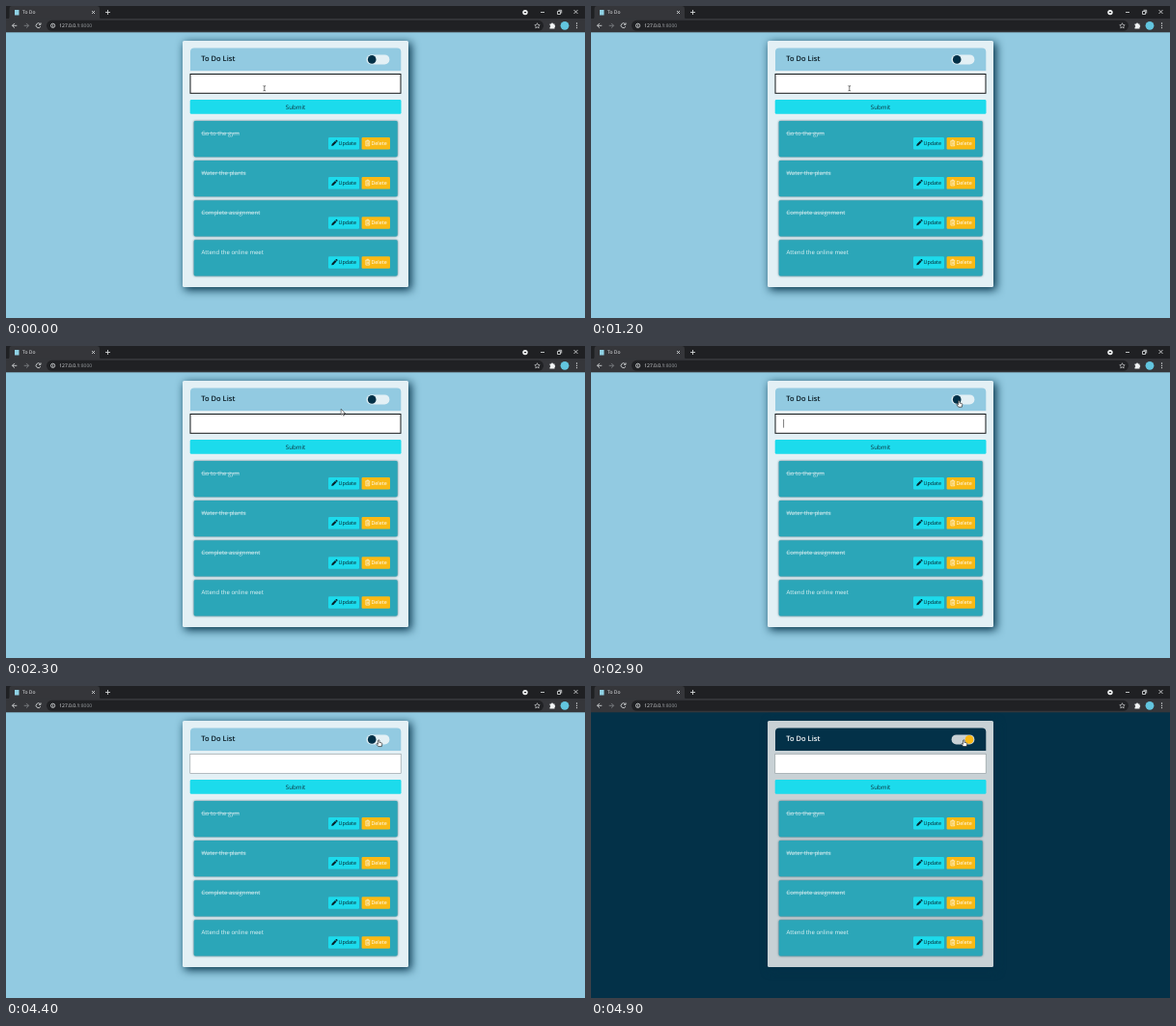
Recreate the animation shown at these times as an HTML page. Size 600 by 323 pixels, loop 5000 ms.

```html
<!DOCTYPE html>
<html lang="en">
<head>
<meta charset="utf-8">
<title>To Do</title>
<style>
html, body { margin: 0; height: 100%; overflow: hidden; }
svg {
  display: block; width: 100%; height: 100%;
  font: 6px "Open Sans", "Noto Sans", sans-serif;
  text-rendering: geometricPrecision;
  --page: #92cae1; --panel: #e3f0f5; --title: #06151d;
}
svg.night { --page: #033148; --panel: #c8d1d5; --title: #fff; }
.page { fill: var(--page); }
.panel { fill: var(--panel); }
.title { fill: var(--title); font-size: 7.5px; font-weight: 600; }
.shadow { fill: #023047; filter: blur(5px); }
.card { fill: #2ba6b8; filter: drop-shadow(0 .4px 1.3px #0a3a4cb0); }
.cyan { fill: #1cdbec; }
.amber { fill: #f9b914; }
.small { font-size: 5.4px; }
.done { text-decoration: line-through; }
.line { fill: none; stroke: #e4e6e8; stroke-width: .8; }
</style>
</head>
<body>
<svg id="stage" viewBox="0 0 600 323" preserveAspectRatio="none">
  <rect class="page" width="600" height="323"/>

  <!-- browser bar -->
  <rect width="600" height="14" fill="#1f2023"/>
  <rect y="13" width="600" height="14.3" fill="#35363a"/>
  <path d="M1 13.5Q3.5 13.5 3.5 11V3Q3.5 0 6 0H94Q97 0 97 3V11Q97 13.5 99.5 13.5Z" fill="#35363a"/>
  <rect x="9" y="4" width="4.5" height="5.5" fill="#8fd0e3"/>
  <text x="17" y="8.4" font-size="5" fill="#e8eaed">To Do</text>
  <path class="line" d="M89 5l3 3m0-3l-3 3M103 6.5h5m-2.5-2.5v5M554 6.5h4M571.5 5.5h3v3h-3zm1-1.2h3.2v3.2M588.5 4l4 4m0-4l-4 4" stroke-width=".7"/>
  <circle cx="538" cy="6.6" r="2.7" fill="#f1f3f4"/>
  <path d="M536.6 6h2.8l-1.4 1.8z" fill="#202124"/>
  <rect x="42" y="14.8" width="515" height="11" rx="5.5" fill="#202124"/>
  <path class="line" d="M11.3 20.3H6.5m2.4-2.4l-2.4 2.4l2.4 2.4M35.4 18.7a2.4 2.4 0 1 0 .4 2.4M36 17.4v1.9h-1.9"/>
  <path class="line" d="M18.7 20.3h4.8m-2.4-2.4l2.4 2.4l-2.4 2.4" stroke="#85888c" style="stroke:#85888c"/>
  <circle class="line" cx="48.6" cy="20.3" r="2.1" stroke-width=".6"/>
  <path class="line" d="M48.6 19v.6m0 .5v1.4"/>
  <text x="55.2" y="22.2" font-size="5" fill="#e8eaed">127.0.0.1<tspan fill="#969a9e">:8000</tspan></text>
  <path class="line" d="M550.5 17.7l.8 1.8 1.9.2-1.4 1.3.4 1.9-1.7-1-1.7 1 .4-1.9-1.4-1.3 1.9-.2z" style="stroke-width:.6"/>
  <path d="M563.5 18.5h1.5a1 1 0 0 1 2 0h1.5v1.6a1 1 0 0 1 0 1.9v1.5h-5v-1.5a1 1 0 0 0 0-1.9z" fill="#f1f3f4"/>
  <circle cx="579" cy="20.3" r="4.4" fill="#62c5df"/>
  <g fill="#e4e6e8"><circle cx="591.5" cy="18" r=".65"/><circle cx="591.5" cy="20.3" r=".65"/><circle cx="591.5" cy="22.6" r=".65"/></g>

  <!-- panel -->
  <rect class="shadow" x="185" y="38" width="235" height="256"/>
  <rect y="13" width="600" height="14.3" fill="none"/>
  <rect class="panel" x="183" y="36" width="234" height="255" rx="1.5"/>
  <path class="page" d="M191 67V47.5Q191 43.5 195 43.5H405.3Q409.3 43.5 409.3 47.5V67Z"/>
  <text class="title" x="202.3" y="57">To Do List</text>
  <rect class="panel" x="373.6" y="50.4" width="23.8" height="10" rx="5"/>
  <circle id="knob" cy="55.4" r="4.3"/>
  <rect id="field" fill="#fff"/>
  <path id="caret" d="M199.6 75.8v8.8" stroke="#222" stroke-width=".6"/>
  <rect class="cyan" x="190.7" y="97" width="218.8" height="14.8" rx="1.4"/>
  <text x="300" y="106.9" font-size="6.2" text-anchor="middle" fill="#0b2f3c">Submit</text>
  <g id="tasks"></g>

  <!-- pointers, hot spot at 0,0 -->
  <g id="beam"><path d="M-1.3-2.6Q0-2.6 0-1.8Q0-2.6 1.3-2.6M0-2V2M-1.3 2.6Q0 2.6 0 1.8Q0 2.6 1.3 2.6" fill="none" stroke="#222" stroke-width=".6"/></g>
  <g id="arrow"><path d="M0 0V6.2L1.5 4.9L2.5 7.1L3.4 6.7L2.4 4.5H4.4Z" fill="#fff" stroke="#111" stroke-width=".5"/></g>
  <g id="hand"><path d="M-.7.2Q0-.5.7.2V2.4L2.9 2.9Q3.6 3.1 3.5 3.9L3 6.6H-.5L-2.4 4.2Q-2.4 3.3-1.6 3.6L-.7 4.3Z" fill="#fff" stroke="#111" stroke-width=".6"/></g>
</svg>
<script>
const $ = id => document.getElementById(id);
const clamp = x => Math.min(1, Math.max(0, x));
const smooth = x => x * x * (3 - 2 * x);
const mix = (a, b, k) => a + (b - a) * k;
const show = (id, on) => $(id).style.display = on ? '' : 'none';
const set = (id, attrs) => {
  for (const key in attrs) $(id).setAttribute(key, attrs[key]);
};

const task = (label, i) => `<g transform="translate(0 ${i * 41.1})">
  <rect class="card" x="194.7" y="119" width="211" height="37.2" rx="1.4"/>
  <text x="202.4" y="133.8" fill="${i < 3 ? '#d3eaee' : '#e6f4f6'}" class="${i < 3 ? 'done' : ''}">${label}</text>
  <rect class="cyan" x="334" y="136" width="32" height="12.5" rx="1.2"/>
  <path d="M337.3 145l.4-1.9 3.3-3.3 1.5 1.5-3.3 3.3zM341.4 139.4l.6-.6q.4-.3.8 0l.7.7q.3.4 0 .8l-.6.6z" fill="#06222c"/>
  <text class="small" x="344.6" y="144.2" fill="#06222c">Update</text>
  <rect class="amber" x="368.6" y="136" width="29.4" height="12.5" rx="1.2"/>
  <path d="M372.3 140h5M373.9 139.7v-.7h1.8v.7M372.9 140.2v4.6h3.8v-4.6M374.2 141.2v2.6m1.2-2.6v2.6" fill="none" stroke="#fff" stroke-width=".6"/>
  <text class="small" x="378.4" y="144.2" fill="#fff">Delete</text></g>`;
$('tasks').innerHTML = ['Go to the gym', 'Water the plants', 'Complete assignment', 'Attend the online meet'].map(task).join('');

const day = [2, 48, 71], sun = [249, 185, 20];

function draw(now) {
  const t = Math.floor(now % 5000 / 100) * 100;
  const focused = t < 4300;
  $('stage').classList.toggle('night', t >= 4500);

  const slide = 1 - (1 - clamp((t - 4445) / 400)) ** 2.5;
  set('knob', {
    cx: mix(379.2, 392, slide),
    fill: `rgb(${day.map((c, i) => Math.round(mix(c, sun[i], slide)))})`
  });

  const inset = focused ? .5 : .3;
  set('field', {
    x: 190.5 + inset, y: 70 + inset, width: 219 - 2 * inset, height: 20.8 - 2 * inset,
    stroke: focused ? '#14181a' : '#8b9599', 'stroke-width': 2 * inset
  });
  show('caret', focused && (t + 560) % 1060 < 530);

  const move = smooth(clamp((t - 1600) / 1100));
  const x = mix(267.8, 381.3, move) + 5 * smooth(clamp((t - 3000) / 1000));
  const y = mix(85.2, 56.6, move) - .6 * smooth(clamp((t - 3000) / 1000));
  const kind = y > 70 ? 'beam' : x > 373.6 ? 'hand' : 'arrow';
  for (const id of ['beam', 'arrow', 'hand']) show(id, id === kind);
  set(kind, { transform: `translate(${x} ${y})` });
}

function tick(now) {
  draw(now);
  requestAnimationFrame(tick);
}
draw(0);
requestAnimationFrame(tick);
</script>
</body>
</html>
```
